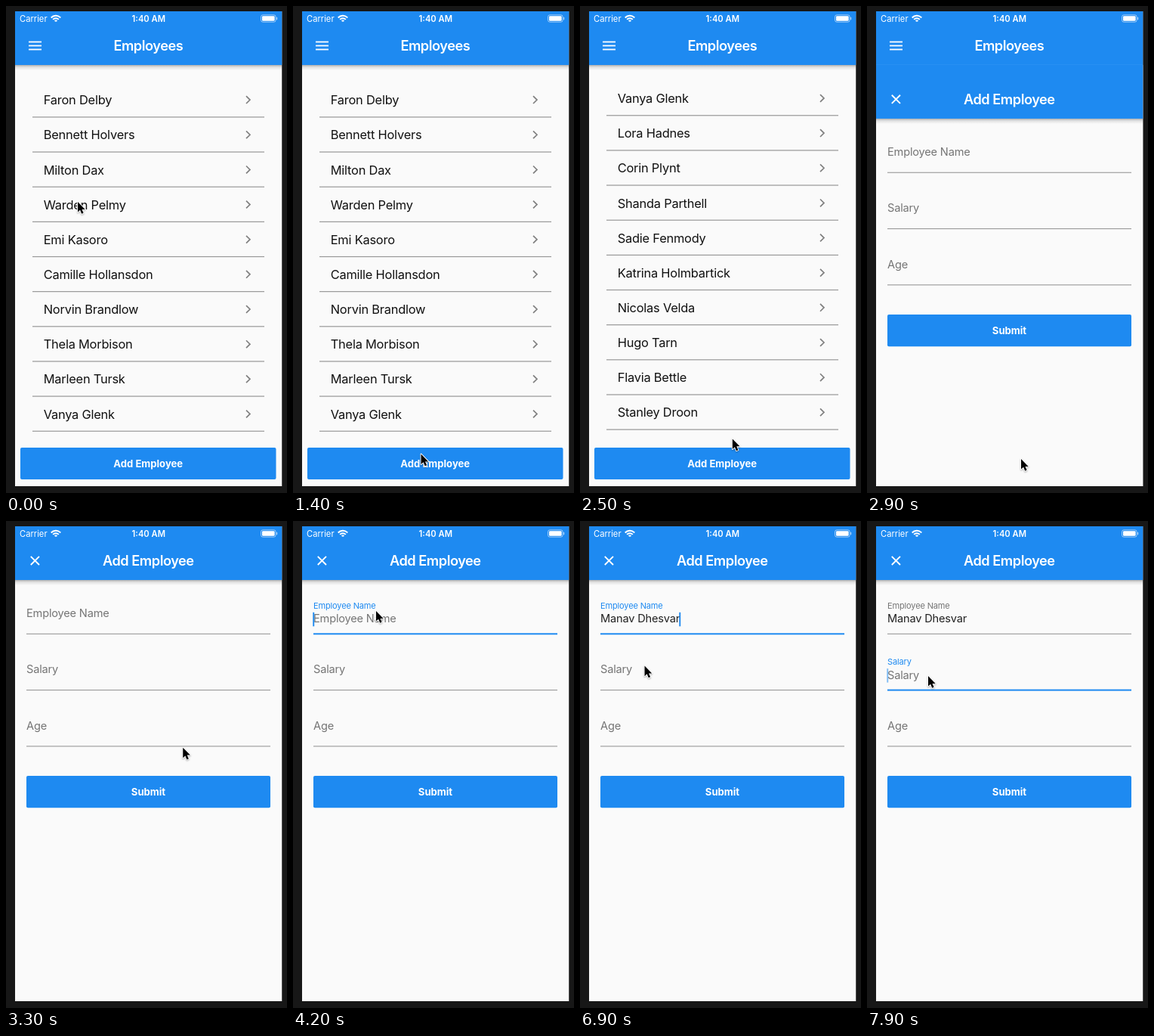
Write an HTML page with a canvas that moves like this. It is 372 px wide and 644 px high and loops after 8000 ms.

```html
<!DOCTYPE html>
<html lang="en">
<head>
<meta charset="utf-8">
<title>Employees</title>
<style>
html, body { margin: 0; width: 100%; height: 100%; overflow: hidden; background: #171717; }
canvas { display: block; width: 372px; height: 644px; }
</style>
</head>
<body>
<canvas id="stage" width="372" height="644"></canvas>
<script>
const ctx = document.getElementById('stage').getContext('2d');
const LOOP = 8000, STEP = 100;
const BLUE = '#1e8af1', PAPER = '#fafafa', GRAY = '#757575', INK = '#212121', RULE = '#989898';
const SCREEN = { x: 12, y: 7, w: 353.5, h: 628 };
const ROW = 46.15, LIST_TOP = 101, SCROLL = 417.5;
const FIELD_TOP = 149.3, FIELD_GAP = 74.3;

const people = [
  'Faron Delby', 'Bennett Holvers', 'Milton Dax', 'Warden Pelmy', 'Emi Kasoro',
  'Camille Hollansdon', 'Norvin Brandlow', 'Thela Morbison', 'Marleen Tursk', 'Vanya Glenk',
  'Lora Hadnes', 'Corin Plynt', 'Shanda Parthell', 'Sadie Fenmody', 'Katrina Holmbartick',
  'Nicolas Velda', 'Hugo Tarn', 'Flavia Bettle', 'Stanley Droon'
];
const entry = 'Manav Dhesvar';
const arrow = new Path2D('M0 0V13.6L3.1 10.8L5.2 15.8L7.6 14.8L5.5 9.9H9.7Z');

// The pointer rests at home, then makes each move: start, duration, x, y.
const home = [95, 259];
const moves = [
  [250, 450, 176, 660],
  [900, 500, 169.5, 592.5],
  [1400, 500, 190, 429],
  [2200, 400, 204, 599],
  [2900, 250, 262, 340],
  [3150, 550, 110, 119],
  [6600, 400, 81, 205]
];

const clamp = v => Math.max(0, Math.min(1, v));
const mix = (a, b, p) => a + (b - a) * p;
const ease = (t, start, length) => {
  const p = clamp((t - start) / length);
  return p * p * (3 - 2 * p);
};
const burst = (t, start, every, count) =>
  t < start ? 0 : Math.min(count, 1 + Math.floor((t - start) / every));

function bezier(x, x1, y1, x2, y2) {
  const at = (s, a, b) => 3 * (1 - s) * (1 - s) * s * a + 3 * (1 - s) * s * s * b + s * s * s;
  let lo = 0, hi = 1;
  for (let i = 0; i < 24; i++) {
    const mid = (lo + hi) / 2;
    if (at(mid, x1, x2) < x) lo = mid; else hi = mid;
  }
  return at(lo, y1, y2);
}

function blend(a, b, p) {
  const part = (c, i) => parseInt(c.slice(1 + i * 2, 3 + i * 2), 16);
  return `rgb(${[0, 1, 2].map(i => Math.round(mix(part(a, i), part(b, i), p)))})`;
}

function rect(x, y, w, h, color) {
  ctx.fillStyle = color;
  ctx.fillRect(x, y, w, h);
}

function round(x, y, w, h, r, color) {
  ctx.beginPath();
  ctx.roundRect(x, y, w, h, r);
  ctx.fillStyle = color;
  ctx.fill();
}

function text(str, x, y, size, color, weight = 400, spacing = -0.013, align = 'left') {
  ctx.font = `${weight} ${size}px Inter, "Open Sans", sans-serif`;
  ctx.letterSpacing = `${spacing * size}px`;
  ctx.textAlign = align;
  ctx.fillStyle = color;
  ctx.fillText(str, x, y);
  return ctx.measureText(str).width;
}

function stroke(path, color, width) {
  ctx.strokeStyle = color;
  ctx.lineWidth = width;
  ctx.stroke(new Path2D(path));
}

function button(label, x, y, w, h) {
  round(x, y, w, h, 2, BLUE);
  text(label, x + w / 2, y + h / 2 + 4.5, 13.1, '#fff', 700, 0, 'center');
}

function header(title) {
  const fade = ctx.createLinearGradient(0, 78, 0, 85);
  fade.addColorStop(0, 'rgba(0,0,0,0.3)');
  fade.addColorStop(0.4, 'rgba(0,0,0,0.1)');
  fade.addColorStop(1, 'rgba(0,0,0,0)');
  rect(SCREEN.x, 78, SCREEN.w, 7, fade);
  rect(SCREEN.x, SCREEN.y, SCREEN.w, 71, BLUE);
  text(title, 188.3, 59, 18.2, '#fff', 600, -0.026, 'center');
}

function listPage(t) {
  rect(SCREEN.x, SCREEN.y, SCREEN.w, SCREEN.h, PAPER);
  header('Employees');
  for (let i = 0; i < 3; i++) rect(30, 46.6 + i * 5, 17, 1.8, '#fff');

  const scroll = SCROLL * ease(t, 1500, 600);
  ctx.save();
  ctx.beginPath();
  ctx.rect(SCREEN.x, LIST_TOP, SCREEN.w, ROW * 10 + 0.5);
  ctx.clip();
  people.forEach((name, i) => {
    const y = LIST_TOP + i * ROW - scroll;
    text(name, 49.7, y + 29.2, 16.4, '#111');
    stroke(`M318 ${y + 18.2}l5 4.9l-5 4.9`, '#808080', 1.7);
    rect(35, y + 45.3, 307, 1.2, RULE);
  });
  ctx.restore();
  button('Add Employee', 19, 584, 338.5, 42);
}

// focus colours the underline; float lifts the label.
function field(label, row, focus, float, value, caret) {
  const y = FIELD_TOP + row * FIELD_GAP;
  const thick = mix(1.1, 2, focus);
  text(label, 27, mix(y - 22.2, y - 33.3, float), mix(14.6, 11, float), blend(GRAY, BLUE, focus));
  rect(27, y - thick / 2, 323, thick, blend(RULE, BLUE, focus));

  ctx.globalAlpha = float;
  const width = text(value || label, 27, y - 15, 14.6, value ? INK : GRAY);
  ctx.globalAlpha = caret;
  rect(26.3 + (value ? width : 0), y - 28.5, 1.9, 18.5, BLUE);
  ctx.globalAlpha = 1;
}

function formPage(t) {
  const slide = bezier(clamp((t - 2700) / 450), 0.35, 0.91, 0.33, 0.97);
  const name = ease(t, 3800, 300), salary = ease(t, 7050, 300);
  const typed = burst(t, 4600, 140, 6) + burst(t, 5500, 1, 2) + burst(t, 5800, 100, 5);
  const salaryCaret = ease(t, 7100, 100) * (1 - 0.45 * ease(t, 7800, 100));

  ctx.save();
  ctx.translate(0, SCREEN.h * (1 - slide));
  rect(SCREEN.x, SCREEN.y, SCREEN.w, SCREEN.h, PAPER);
  header('Add Employee');
  stroke('M32.8 46.8L44 58M44 46.8L32.8 58', '#fff', 1.9);
  field('Employee Name', 0, name * (1 - salary), name, entry.slice(0, typed), t >= 4000 && t < 7100 ? 1 : 0);
  field('Salary', 1, salary, salary, '', salaryCaret);
  field('Age', 2, 0, 0, '', 0);
  button('Submit', 27, 337, 323, 42.3);
  ctx.restore();
}

function statusBar() {
  text('Carrier', 18, 20.8, 11.2, '#fff', 400, 0);
  text('1:40 AM', 188.8, 20.6, 11.2, '#fff', 600, 0, 'center');
  ctx.strokeStyle = '#fff';
  ctx.lineWidth = 2;
  for (const r of [1.8, 5.2, 8.6]) {
    ctx.beginPath();
    ctx.arc(66, 21.4, r, -Math.PI * 0.76, -Math.PI * 0.24);
    ctx.stroke();
  }
  ctx.beginPath();
  ctx.roundRect(337.5, 11.8, 19.6, 9.4, 2.6);
  ctx.strokeStyle = 'rgba(255,255,255,0.55)';
  ctx.lineWidth = 1;
  ctx.stroke();
  round(339, 13.2, 16.6, 6.6, 1.4, '#fff');
  rect(358, 14.8, 1.2, 3.4, 'rgba(255,255,255,0.6)');
}

function pointer(t) {
  let [x, y] = home;
  for (const [start, length, toX, toY] of moves) {
    const p = ease(t, start, length);
    x = mix(x, toX, p);
    y = mix(y, toY, p);
  }
  ctx.save();
  ctx.translate(x, y);
  ctx.lineJoin = 'round';
  ctx.strokeStyle = '#fff';
  ctx.lineWidth = 1.8;
  ctx.shadowColor = 'rgba(0,0,0,0.3)';
  ctx.shadowBlur = 2;
  ctx.shadowOffsetY = 1;
  ctx.stroke(arrow);
  ctx.shadowColor = 'transparent';
  ctx.fillStyle = '#000';
  ctx.fill(arrow);
  ctx.restore();
}

function draw(t) {
  rect(0, 0, 372, 644, '#171717');
  ctx.save();
  ctx.beginPath();
  ctx.rect(SCREEN.x, SCREEN.y, SCREEN.w, SCREEN.h);
  ctx.clip();
  if (t < 3200) listPage(t);
  if (t > 2700) formPage(t);
  statusBar();
  ctx.restore();
  pointer(t);
}

const start = performance.now();
function tick() {
  const t = (performance.now() - start) % LOOP;
  draw(Math.floor(t / STEP) * STEP);
  requestAnimationFrame(tick);
}
tick();
</script>
</body>
</html>
```
